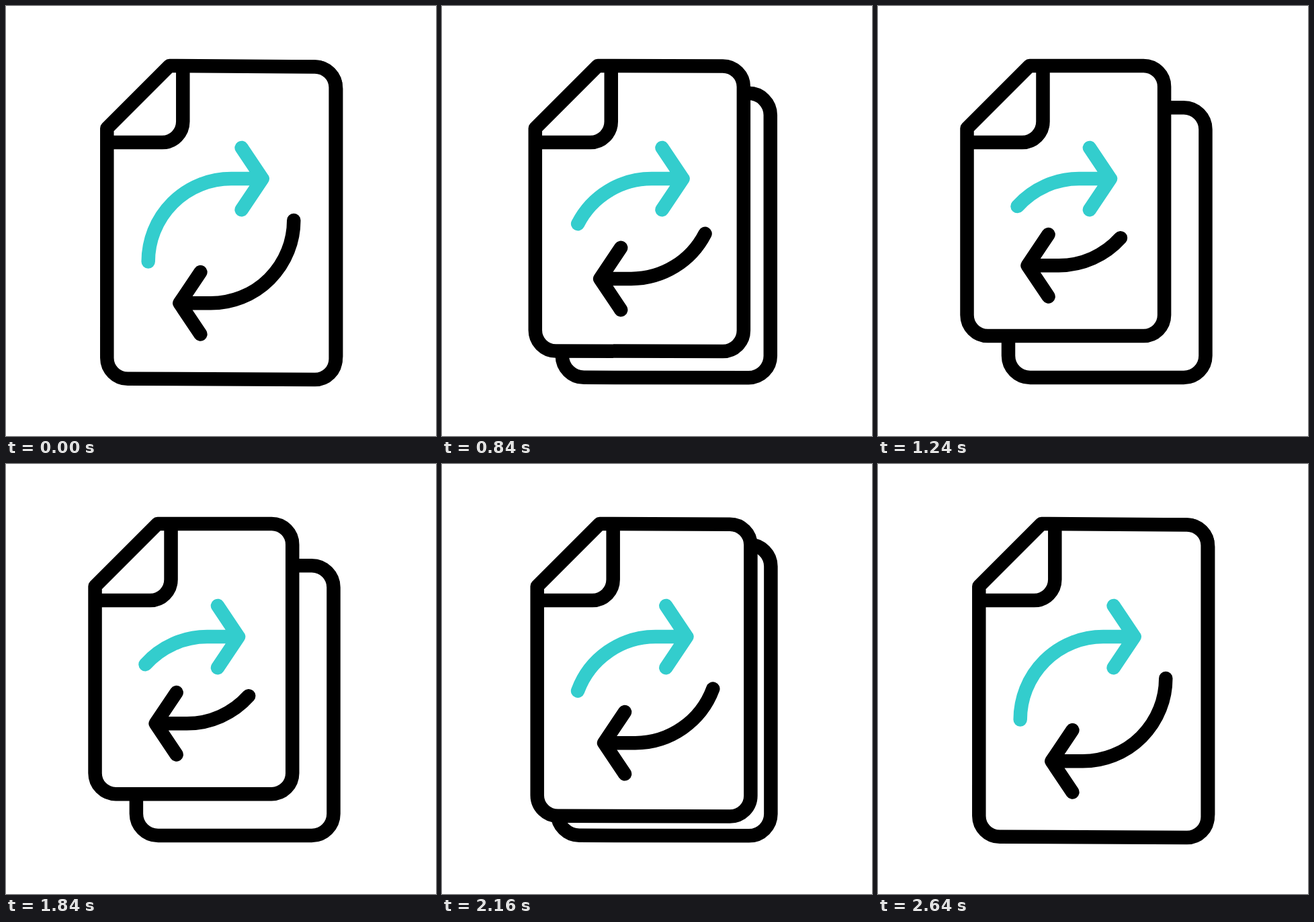
Animation, 640 px wide and 640 px high, one loop 3 s. Source, as an HTML page:

```html
<!DOCTYPE html>
<html lang="en">
<head>
<meta charset="utf-8">
<title>Copy file</title>
<style>
  html, body { margin: 0; width: 100%; height: 100%; overflow: hidden; background: #fff; }
  svg { display: block; width: 100vw; height: 100vh; }
  path { fill: none; stroke: #000; stroke-width: 20.5; stroke-linejoin: round; }
  #page { fill: #fff; }
  #up, #down { stroke-linecap: round; }
  #up { stroke: #33cdcd; }
</style>
</head>
<body>
<svg viewBox="0 0 640 640">
  <path id="back"/>
  <path id="page"/>
  <path id="fold"/>
  <path id="up"/>
  <path id="down"/>
</svg>
<script>
const LOOP = 3000;
const OUT = [480, 760];   // start, duration
const BACK = [1800, 840];
const TOP = 89, CUT = 93, R = 30.9, BACK_R = 32.5, ARC = 123.4;

const draw = (id, d) => document.getElementById(id).setAttribute('d', d);
const mix = (a, b, p) => a + (b - a) * p;

// cubic-bezier(.6, 0, .2, 1)
function ease(x) {
  if (x <= 0) return 0;
  if (x >= 1) return 1;
  let lo = 0, hi = 1, m;
  for (let i = 0; i < 24; i++) {
    m = (lo + hi) / 2;
    const bx = 1.8 * m * (1 - m) ** 2 + 0.6 * m * m * (1 - m) + m ** 3;
    if (bx < x) lo = m; else hi = m;
  }
  return m * m * (3 - 2 * m);
}

const progress = (t, [start, length]) => ease((t - start) / length);

// Arrow with its tip at x, y; dir 1 points right, -1 points left.
function arrow(x, y, dir, angle) {
  const a = angle * Math.PI / 180;
  const cx = x - 46.5 * dir, cy = y + ARC * dir;
  const tx = cx - ARC * Math.cos(a) * dir, ty = cy - ARC * Math.sin(a) * dir;
  const hx = x - 31 * dir;
  return `M${tx} ${ty}A${ARC} ${ARC} 0 0 1 ${cx} ${y}H${x}` +
         `M${hx} ${y - 46.2}L${x} ${y}L${hx} ${y + 46.2}`;
}

function render(p) {
  const corner = (r, x, y) => `A${r} ${r} 0 0 1 ${x} ${y}`;
  const tilt = 1.4 * (1 - p);

  const l = mix(150.3, 132.5, p), r = mix(490.7, 426.1, p), b = mix(554.7, 491, p);
  draw('page', `M${l} ${TOP + CUT}L${l + CUT} ${TOP}L${r - R} ${TOP + tilt}` +
    corner(R, r, TOP + R + tilt) + `V${b - R + tilt}` +
    corner(R, r - R, b + tilt) + `L${l + R} ${b}` +
    corner(R, l, b - R) + 'Z');

  const fx = l + 113, fy = 203;
  draw('fold', `M${fx} ${TOP}V${fy - R}` + corner(R, fx - R, fy) + `H${l}`);

  const bl = mix(151, 194, p), br = mix(491.2, 487.5, p), bt = mix(90.5, 151.3, p);
  const bb = 553, q = BACK_R;
  draw('back', `M382 ${bt}H${br - q}` + corner(q, br, bt + q) +
    `V${bb - q}` + corner(q, br - q, bb + tilt / 2) +
    `L${bl + q} ${bb - tilt / 3}` + corner(q, bl, bb - q) + 'V478');

  const angle = 41.9 * p;
  draw('up', arrow(mix(381.6, 345.9, p), 257.1, 1, angle));
  draw('down', arrow(mix(258.4, 222.6, p), mix(442.3, 386.2, p), -1, angle));
}

function tick() {
  const t = performance.now() % LOOP;
  render(progress(t, OUT) - progress(t, BACK));
  requestAnimationFrame(tick);
}
tick();
</script>
</body>
</html>
```
